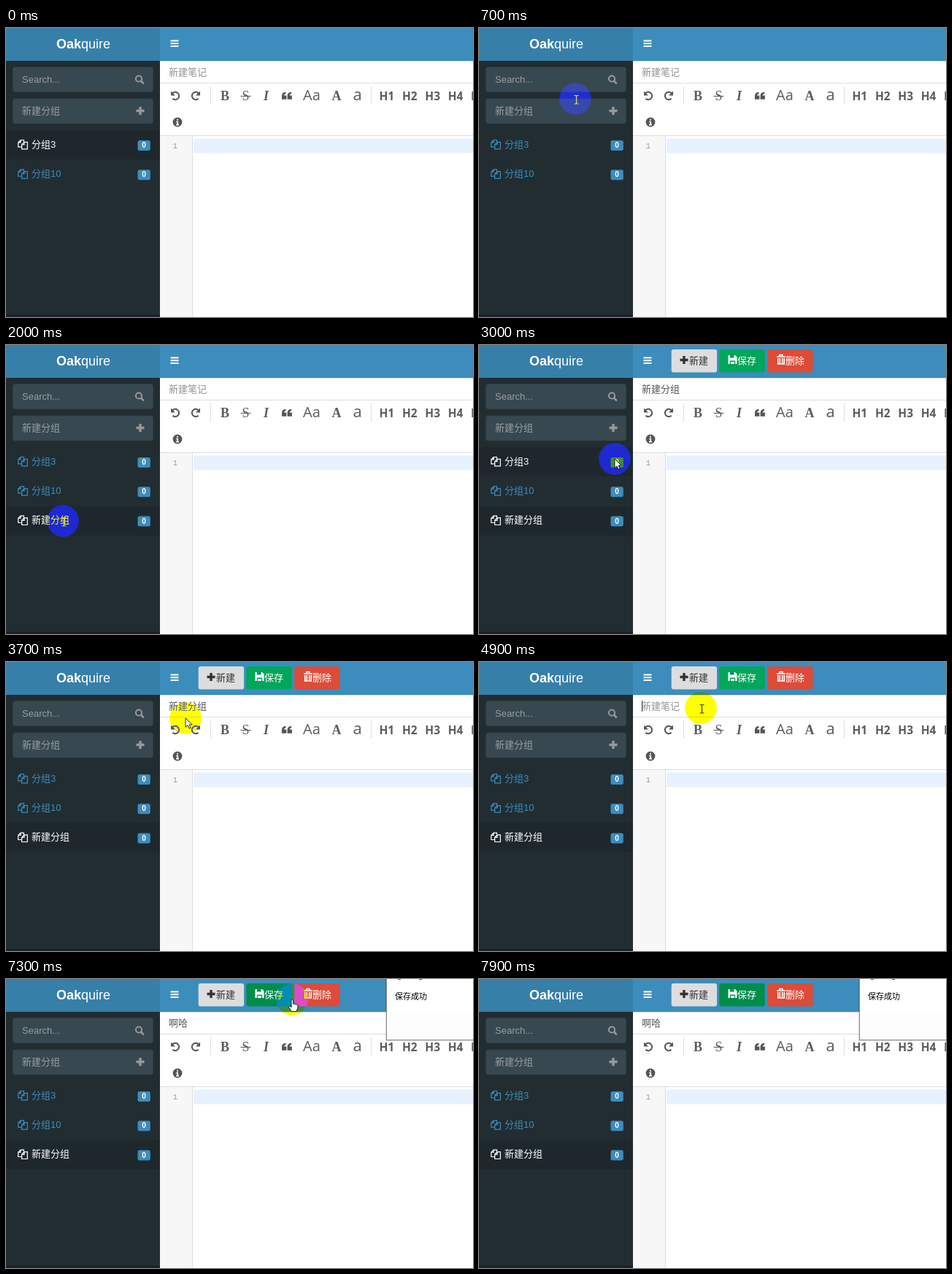
Recreate the animation shown at these times as an HTML page. Size 640 by 396 pixels, loop 8 s.

```html
<!DOCTYPE html>
<html lang="zh">
<head>
<meta charset="utf-8">
<title>Note editor</title>
<style>
html, body { margin: 0; width: 100%; height: 100%; overflow: hidden; background: #fff; }
svg { display: block; width: 100%; height: 100%; }
text { font: 13px "Liberation Sans", "Noto Sans CJK SC", "Noto Sans CJK", sans-serif; white-space: pre; }
.brand { font-size: 18px; fill: #fff; }
.field { fill: #374850; stroke: #303f46; }
.hint { fill: #9a9fa1; }
.row rect.back { fill: none; }
.row { fill: #3c8dbc; stroke: #3c8dbc; }
.row.lit { fill: #fff; stroke: #fff; }
.row.lit rect.back { fill: #1e282c; }
.row text { stroke: none; }
.row .badge { fill: #3c8dbc; stroke: none; }
.row .count { fill: #fff; font-size: 10px; font-weight: bold; text-anchor: middle; }
.tool text { fill: #5c5c5c; }
.tool .serif { font: bold 18px "Liberation Serif", serif; }
.tool .sans { font: 500 20px "Open Sans", sans-serif; }
.tool .head { font: 700 15.5px "Open Sans", sans-serif; }
.line { stroke: #ddd; fill: none; }
</style>
</head>
<body>
<svg viewBox="0 0 640 396" preserveAspectRatio="none">
  <defs>
    <path id="plus" d="M-5.5 0H5.5M0-5.5V5.5" stroke-width="3.4"/>
    <g id="copy" fill="none" stroke-width="1.2">
      <path d="M5.3 3.4H.7V-2.6L4-6H8.4V-3.4M4-6V-2.6H.7"/>
      <path d="M5.6 6.4H13.3V-3.2H9L5.6 .2ZM9-3.2V.2H5.6"/>
    </g>
    <g id="undo">
      <path d="M227.8 89.8A5.2 5.2 0 1 1 228.4 96.8" fill="none" stroke="#555" stroke-width="2"/>
      <path d="M226 86.5V92.5H232Z" fill="#555"/>
    </g>
    <path id="quote" d="M0 5.3V.5Q0-4.2 5.5-4.8V-2.6Q3-2 3 0H6.3V5.3Z"/>
  </defs>

  <rect width="640" height="396" fill="#fff"/>
  <rect width="211" height="396" fill="#222d32"/>
  <rect y="393" width="211" height="3" fill="#1b1f27"/>
  <rect width="211" height="45" fill="#367fa9"/>
  <rect x="211" width="429" height="45" fill="#3c8dbc"/>
  <path class="line" d="M211 45.5H640"/>
  <text class="brand" x="106" y="28" text-anchor="middle"><tspan font-weight="bold">Oak</tspan>quire</text>
  <path d="M225.5 17.5h11M225.5 21.3h11M225.5 25.1h11" stroke="#fff" stroke-width="2"/>

  <rect class="field" x="9.5" y="53.5" width="192" height="34" rx="3"/>
  <rect class="field" x="9.5" y="97" width="192" height="34" rx="3"/>
  <text class="hint" x="22" y="75">Search...</text>
  <text class="hint" x="22" y="118">新建分组</text>
  <g stroke="#999" fill="none">
    <circle cx="182" cy="69.5" r="4.1" stroke-width="2"/>
    <path d="M185 72.5l3.8 3.8" stroke-width="2.5"/>
    <use href="#plus" x="184" y="113.5"/>
  </g>
  <g id="rows"></g>

  <g id="actions">
    <rect x="263.7" y="6" width="62.4" height="31.5" rx="3" fill="#ddd"/>
    <use href="#plus" x="281" y="20.5" stroke="#333"/>
    <text x="288" y="26" fill="#333">新建</text>
    <rect id="save" x="329.3" y="6" width="62.4" height="31.5" rx="3"/>
    <path d="M341.5 14h9.5l2.5 2.5v9.5h-12Z" fill="#fff"/>
    <path d="M344 14h5.5v3.5H344ZM343.8 21.5h7.4V26h-7.4Z" fill="#00965a"/>
    <path d="M345 23h5v3h-5Z" fill="#fff"/>
    <text x="354" y="26" fill="#fff">保存</text>
    <rect x="395.2" y="6" width="62.4" height="31.5" rx="3" fill="#dd4b39"/>
    <path d="M408 16h12M412 15.5v-2h4v2M409.7 18v8h8.6v-8M412.3 18v7M415.7 18v7" fill="none" stroke="#fff" stroke-width="1.6"/>
    <text x="420" y="26" fill="#fff">删除</text>
  </g>

  <text id="title" x="223" y="65"></text>
  <path id="caret" d="M0 53V68" stroke="#333"/>
  <path class="line" d="M211 75.5H640M211 147.5H640M280.5 80V105M500.5 80V105"/>

  <g class="tool">
    <use href="#undo"/>
    <use href="#undo" transform="matrix(-1 0 0 1 492 0)"/>
    <text class="serif" x="294" y="99">B</text>
    <text class="serif" x="323.5" y="99" style="font-weight:normal">S</text>
    <path d="M321.5 93.5h14" stroke="#666" stroke-width="1.2"/>
    <text class="serif" x="353" y="99" style="font-style:italic">I</text>
    <g fill="#555"><use href="#quote" x="378" y="92.5"/><use href="#quote" x="385.6" y="92.5"/></g>
    <text class="sans" x="407" y="99">Aa</text>
    <text class="serif" x="446.5" y="99">A</text>
    <text class="sans" x="475.5" y="98.5" style="font-size:22px">a</text>
    <g id="heads"></g>
    <circle cx="235" cy="129" r="6.4" fill="#555"/>
    <path d="M235 124.8v2M233.2 128.5h2v4M233 132.6h4" stroke="#fff" stroke-width="1.7" fill="none"/>
  </g>

  <rect x="211" y="148" width="44" height="248" fill="#f7f7f7"/>
  <path class="line" d="M255.5 148V396"/>
  <text x="228.5" y="164.5" fill="#999" style="font:11px 'Liberation Mono',monospace">1</text>
  <rect x="257" y="151.5" width="383" height="20" fill="#e8f2ff"/>

  <g id="popup">
    <rect x="520" y="-4" width="130" height="89" fill="#000" opacity=".14"/>
    <rect x="521.5" y="-4" width="130" height="87.5" fill="#fff" stroke="#8a8a8a"/>
    <rect x="522" y="47" width="120" height="36" fill="#fdfdfd"/>
    <path d="M537 .5h4M566 .5h4" stroke="#555"/>
    <text x="533" y="27.8" style="font-size:11px">保存成功</text>
  </g>

  <circle id="spot" r="21.8" fill="#00f" style="mix-blend-mode:difference"/>
  <g id="pointer">
    <path id="arrow" d="M0 0V12.5L3 9.8 5 14.3 7 13.4 5.1 9H9Z" fill="#fff" stroke="#111" stroke-width=".9"/>
    <path id="hand" d="M-1.2 1.2Q0-.6 1.4 1.2V6L3.8 6.4 6.2 7.1 7.6 8.2V11.5L5.7 16.5H-1L-4.6 10.5Q-4.2 8.6-2.6 9.6L-1.2 11Z" fill="#fff" stroke="#111" stroke-width=".9"/>
    <path id="beam" d="M-1.5-4.5H.5L1.5-3.5 2.5-4.5H4.5M1.5-3.5V6M-1.5 7H.5L1.5 6 2.5 7H4.5" fill="none" stroke-width="1.2"/>
  </g>
</svg>
<script>
const $ = id => document.getElementById(id);
const show = (id, on) => { $(id).style.display = on ? "" : "none"; };

const LOOP = 8000, STEP = 100;
const rowTops = [140, 180.3, 220.6];

$("rows").innerHTML = ["分组3", "分组10", "新建分组"].map((name, i) => {
  const mid = rowTops[i] + 20;
  return `<g class="row"><rect class="back" y="${rowTops[i]}" width="211" height="40.3" stroke="none"/>
    <use href="#copy" x="16" y="${mid - .5}"/>
    <text x="35" y="${mid + 3.8}">${name}</text>
    <rect class="badge" x="180.5" y="${mid - 6}" width="17.3" height="14" rx="2.5"/>
    <text class="count" x="189" y="${mid + 4}">0</text></g>`;
}).join("");
const rows = [...document.querySelectorAll(".row")];

$("heads").innerHTML = [1, 2, 3, 4, 5].map((n, i) =>
  `<text class="head" x="${511.5 + i * 31.4}" y="98.5">H${n}</text>`).join("");

// Pointer stops: time, x, y
const path = [
  [200, -30, 62], [500, 80, 88], [900, 184, 106], [1400, 184, 106],
  [1900, 78, 241], [2500, 78, 241], [3000, 186, 156], [3500, 230, 95],
  [4100, 292, 25], [4400, 292, 25], [4800, 304, 63], [6500, 304, 63],
  [7000, 360, 24], [7200, 360, 24], [7700, 670, 62]
];

// Title field: start time, text, is placeholder
const titles = [
  [0, "新建笔记", true], [2200, "新建分组", false], [4400, "新建笔记", true],
  [5300, "啊", false], [5800, "啊哈", false]
];

// Caret: from, to, x
const carets = [[4800, 5300, 223.5], [5300, 5600, 236.5], [5800, 6300, 249.5], [6700, 7000, 249.5]];

function pointerAt(t) {
  const next = path.findIndex(p => p[0] > t);
  if (next < 1) return null;
  const [t0, x0, y0] = path[next - 1], [t1, x1, y1] = path[next];
  const u = (t - t0) / (t1 - t0), k = u * u * (3 - 2 * u);
  return [x0 + (x1 - x0) * k, y0 + (y1 - y0) * k];
}

function pointerKind(x, y) {
  if (x > 264 && x < 458 && y < 38 || x > 165 && x < 202 && y > 97 && y < 131) return "hand";
  if (x < 165 && y > 53 || x > 211 && y > 45 && y < 75) return "beam";
  return "arrow";
}

function drawPointer(pos) {
  show("spot", pos);
  show("pointer", pos);
  if (!pos) return;
  const [x, y] = pos, move = `translate(${x} ${y})`, kind = pointerKind(x, y);
  $("spot").setAttribute("transform", move);
  $("pointer").setAttribute("transform", move);
  for (const id of ["arrow", "hand", "beam"]) show(id, id === kind);
  $("beam").setAttribute("stroke", x < 211 ? "#dd6" : "#443");
}

function draw(t) {
  const pos = pointerAt(t);
  drawPointer(pos);

  rows.forEach((row, i) => {
    const over = pos && pos[0] < 211 && pos[1] >= rowTops[i] && pos[1] < rowTops[i] + 40.3;
    row.classList.toggle("lit", !!over || i === 0 && t < 300 || i === 2 && t >= 1900);
  });
  rows[2].style.display = t >= 1100 ? "" : "none";

  const [, text, empty] = titles.findLast(s => s[0] <= t);
  $("title").textContent = text;
  $("title").setAttribute("fill", empty ? "#929292" : "#555");

  const caret = carets.find(c => t >= c[0] && t < c[1]);
  show("caret", caret);
  if (caret) $("caret").setAttribute("transform", `translate(${caret[2]} 0)`);

  show("actions", t >= 2200);
  $("save").setAttribute("fill", t >= 6900 ? "#008d4c" : "#00a65a");
  show("popup", t >= 7200);
}

const start = performance.now();
function tick() {
  const t = (performance.now() - start) % LOOP;
  draw(Math.floor(t / STEP) * STEP);
  requestAnimationFrame(tick);
}
draw(0);
requestAnimationFrame(tick);
</script>
</body>
</html>
```
